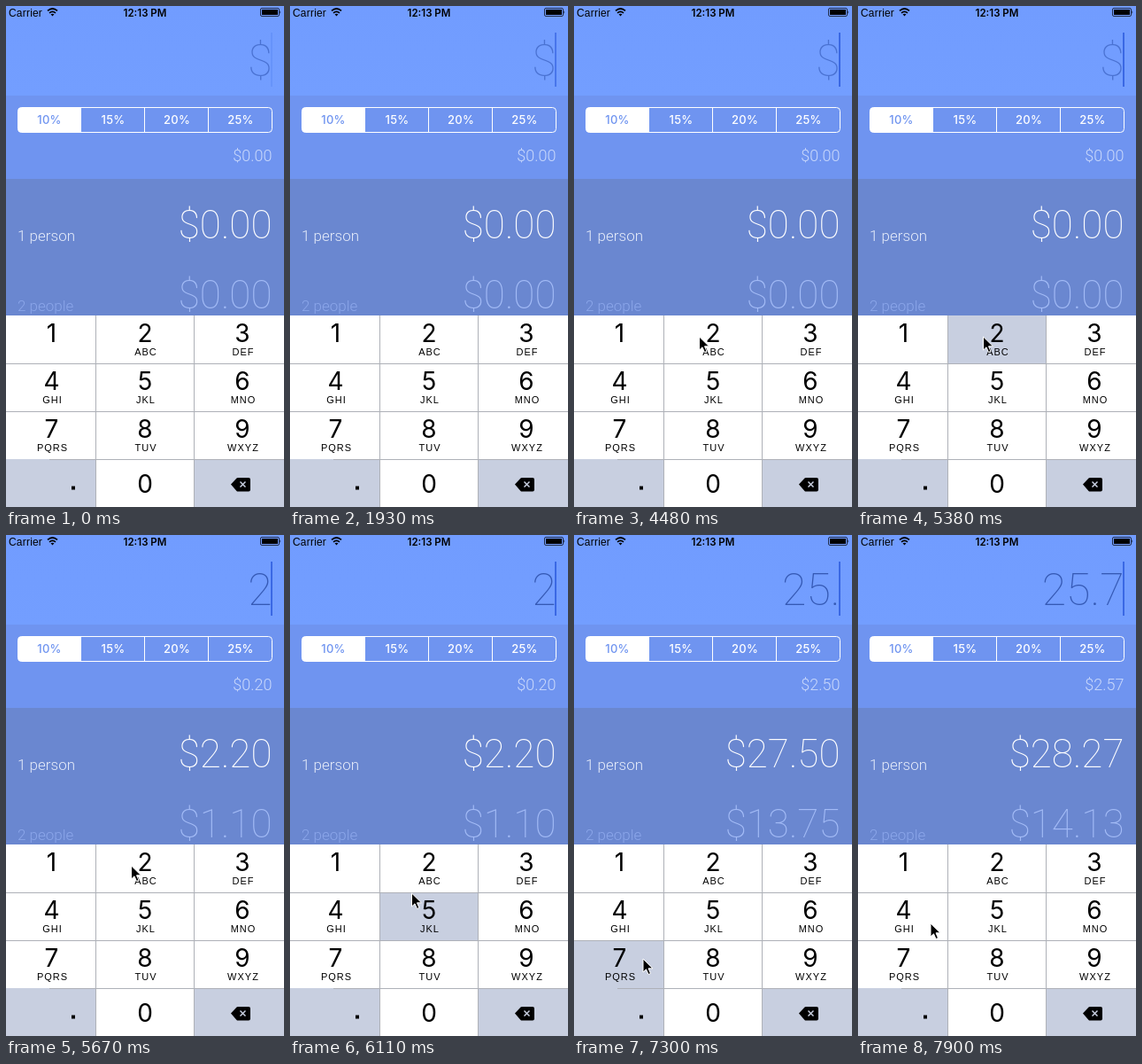
These frames come from a looping animation (314x565 px, 8000 ms). An HTML page:

```html
<!DOCTYPE html>
<html lang="en">
<head>
<meta charset="utf-8">
<title>Tip calculator</title>
<style>
  html, body { margin: 0; width: 100%; height: 100%; overflow: hidden; background: #6a87d0; }
  svg { display: block; width: 314px; height: 565px; }
  .thin { font-family: Roboto, Inter, sans-serif; font-weight: 100; text-anchor: end; }
  .label { font: 300 17px Roboto, Inter, sans-serif; }
  .seg { font: 500 13px Inter, sans-serif; text-anchor: middle; letter-spacing: .3px; }
  .digit { font: 400 28px Inter, sans-serif; text-anchor: middle; }
  .abc { font: 400 11px "Liberation Sans", sans-serif; text-anchor: middle; letter-spacing: 1px; }
</style>
</head>
<body>
<svg viewBox="0 0 314 565">
  <defs>
    <linearGradient id="sky" x2="0" y2="1">
      <stop stop-color="#719cff"/><stop offset="1" stop-color="#739eff"/>
    </linearGradient>
  </defs>
  <rect width="314" height="101" fill="url(#sky)"/>
  <rect y="101" width="314" height="94" fill="#6f94f0"/>
  <rect y="195" width="314" height="154" fill="#6a87d0"/>

  <text x="3" y="12" font-family="Liberation Sans, sans-serif" font-size="12" letter-spacing=".2">Carrier</text>
  <g fill="none" stroke="#000" stroke-width="1.7">
    <path d="M47 5.3Q52.500 .7 58 5.300M49 7.800Q52.500 5 56 7.800"/>
    <path d="M50.500 9.300Q52.500 8 54.500 9.300L52.500 11.500Z" fill="#000" stroke="none"/>
  </g>
  <text x="157" y="11.500" font-family="Inter, sans-serif" font-size="11.500" font-weight="600" text-anchor="middle">12:13 PM</text>
  <rect x="287.500" y="2.500" width="21" height="9" rx="1.500" fill="none" stroke="#000" stroke-opacity=".7"/>
  <rect x="289" y="4" width="18" height="6"/>
  <path d="M309.500 5q1.500 2 0 4z"/>

  <text id="bill" class="thin" x="300.500" y="79" font-size="50"></text>
  <rect id="caret" x="299" y="30" width="2" height="61" fill="#3a68e4"/>

  <g id="segs">
    <path d="M85 114.500H17.500a4 4 0 0 0-4 4V138.500a4 4 0 0 0 4 4H85z" fill="#fff"/>
    <rect x="13.500" y="114.500" width="287" height="28" rx="4" fill="none" stroke="#fff"/>
    <path d="M84.500 114v29M156.500 114v29M228.500 114v29" stroke="#fff"/>
  </g>
  <text id="tip" class="thin" x="300.500" y="175" font-size="18" style="font-weight:300" fill="#c9d8fb"></text>

  <text class="label" x="13" y="265" fill="#e6ecfa">1 person</text>
  <text id="one" class="thin" x="300.500" y="262" font-size="44" fill="#fff"></text>
  <text class="label" x="13" y="344" fill="#8ba6ea">2 people</text>
  <text id="two" class="thin" x="300.500" y="341" font-size="44" fill="#a3bbf6"></text>

  <g id="pad"></g>
  <g>
    <path d="M254 539.500L260.500 532.500Q261 532 262 532H274a2 2 0 0 1 2 2V545.500a2 2 0 0 1-2 2H262Q261 547.500 260.500 547z"/>
    <path d="M264.500 536.500l6 6m0-6l-6 6" stroke="#c8cfe0" stroke-width="1.500"/>
  </g>
  <path id="mouse" d="M0 0V15L3.500 11.800L6 17.500L8.500 16.500L6 10.800H11Z" stroke="#fff" stroke-linejoin="round"/>
</svg>
<script>
const LOOP = 8000, GREY = '#c8cfe0';
const $ = id => document.getElementById(id);
const NS = 'http://www.w3.org/2000/svg';

function add(parent, tag, attrs, text = '') {
  const el = document.createElementNS(NS, tag);
  for (const k in attrs) el.setAttribute(k, attrs[k]);
  el.textContent = text;
  return parent.appendChild(el);
}

['10%', '15%', '20%', '25%'].forEach((s, i) =>
  add($('segs'), 'text', { class: 'seg', x: 49 + i * 72, y: 133, fill: i ? '#fff' : '#6f94f0' }, s));

// Keypad: cells first, then grid lines and captions.
const pad = $('pad'), keys = {};
const colX = [0, 102, 213, 314], mid = [51.5, 157, 267];
add(pad, 'rect', { y: 349, width: 314, height: 216, fill: GREY });
const cell = (name, x, y, w, fill) =>
  keys[name] = add(pad, 'rect', { x, y, width: w, height: 54, fill });
const abc = ['', 'ABC', 'DEF', 'GHI', 'JKL', 'MNO', 'PQRS', 'TUV', 'WXYZ'];
abc.forEach((s, i) => {
  const c = i % 3;
  cell(i + 1, colX[c], 349 + (i / 3 | 0) * 54, colX[c + 1] - colX[c], '#fff');
});
cell('0', 102, 511, 111, '#fff');
cell('.', 49, 511, 53, GREY);
add(pad, 'path', { d: 'M0 403.500H314M0 457.500H314M49 511.500H314M101.500 349V565M212.500 349V565', stroke: '#aeb1b8' });
abc.forEach((s, i) => {
  const x = mid[i % 3], y = 379 + (i / 3 | 0) * 54;
  add(pad, 'text', { class: 'digit', x, y }, i + 1);
  add(pad, 'text', { class: 'abc', x: x + 1, y: y + 15 }, s);
});
add(pad, 'text', { class: 'digit', x: 157, y: 549 }, '0');
add(pad, 'rect', { x: 74, y: 541.5, width: 4, height: 4 });

// Each track is a list of [start, ...values], held until the next entry.
const caret = [[0, .2], [450, 1], [1050, .5], [1480, .15], [1930, .75], [2080, 1], [2380, .5], [2530, 0],
  [2980, .2], [3130, .75], [3280, 1], [4030, .1], [4330, .75], [4480, 1], [4930, .5], [5080, 0], [5380, 1]];
const mouse = [[0, 330, 480], [2830, 303, 467], [2980, 236, 428], [3130, 176, 394], [3280, 148, 378],
  [3430, 142, 374], [4330, 141.5, 373], [5680, 140, 381], [5820, 138, 395], [5960, 137.5, 404],
  [6400, 116, 451], [6550, 92, 495], [6700, 78, 527], [6850, 76, 533], [7150, 77, 502],
  [7300, 78, 478], [7750, 80, 454], [7900, 82, 438]];
const typed = [[0, ''], [5530, '2'], [6260, '25'], [7000, '25.'], [7450, '25.7']];
const press = [[0, ''], [5380, '2'], [5530, ''], [6110, '5'], [6260, ''], [6850, '.'], [7000, ''], [7300, '7'], [7600, '']];

const at = (track, t) => track.findLast(e => e[0] <= t).slice(1);
const money = cents => '$' + (Math.floor(cents) / 100).toFixed(2);

function draw(now) {
  const t = now % LOOP;
  const [bill] = at(typed, t), [held] = at(press, t), [mx, my] = at(mouse, t);
  const cents = Math.round((+bill || 0) * 100), total = Math.floor(cents * 1.1 + 1e-6);
  $('bill').textContent = bill || '$';
  $('bill').setAttribute('fill', bill ? '#3559b4' : '#4a72d2');
  $('tip').textContent = money(cents / 10);
  $('one').textContent = money(total);
  $('two').textContent = money(total / 2);
  $('caret').setAttribute('opacity', at(caret, t)[0]);
  $('mouse').setAttribute('transform', `translate(${mx} ${my})`);
  for (const k in keys) keys[k].setAttribute('fill', (k === held) !== (k === '.') ? GREY : '#fff');
}

const start = performance.now();
(function tick() {
  draw(performance.now() - start);
  requestAnimationFrame(tick);
})();
</script>
</body>
</html>
```
